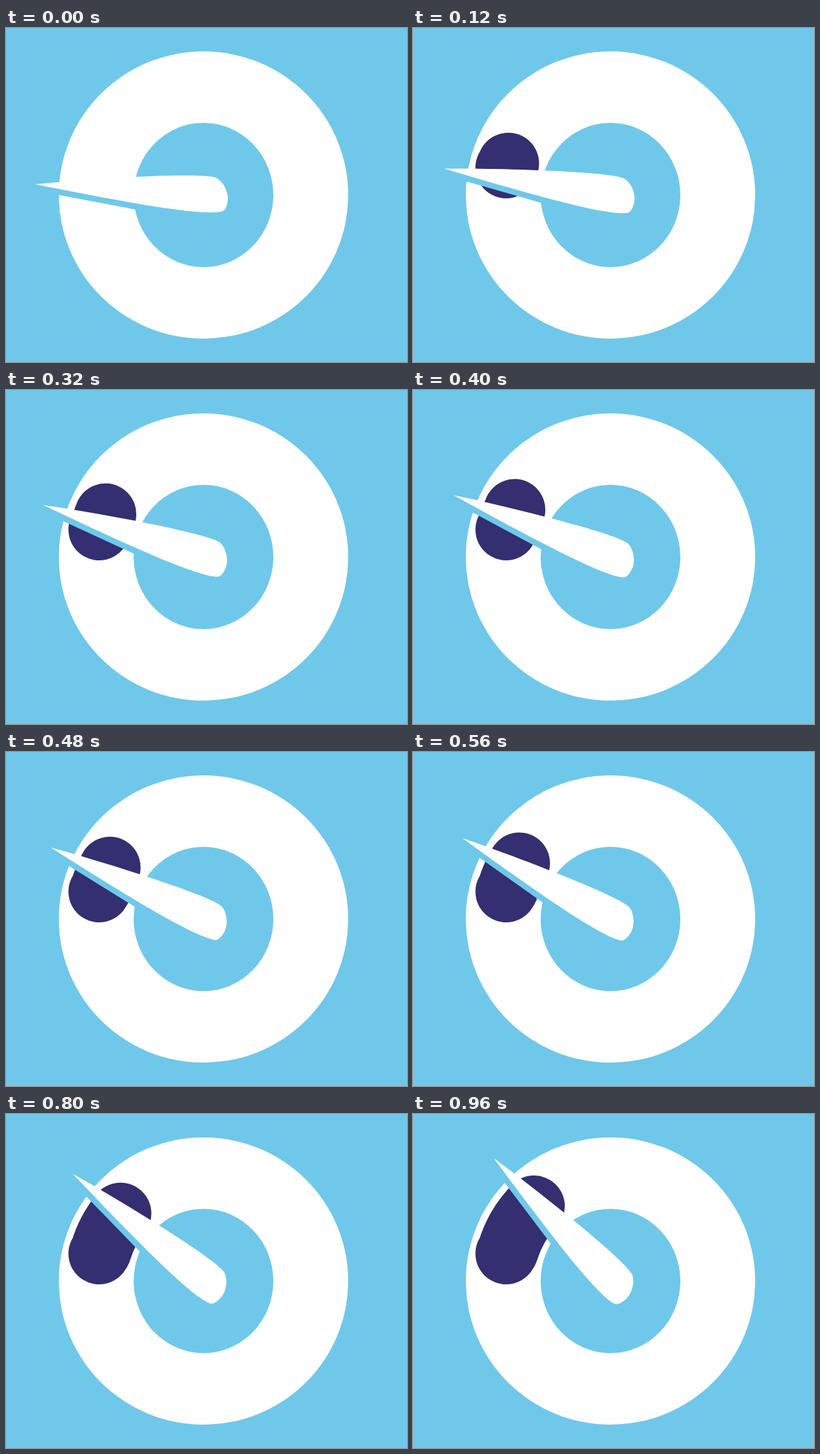
Recreate the animation shown at these times as an HTML page. Size 600 by 500 pixels, loop 1000 ms.

```html
<!DOCTYPE html>
<html>
<head>
<meta charset="utf-8">
<title>Gauge</title>
<style>
  html, body { margin: 0; height: 100%; overflow: hidden; background: #6fc8ea; }
  svg { display: block; }
</style>
</head>
<body>
<svg width="600" height="500" viewBox="0 0 600 500">
  <rect width="600" height="500" fill="#6fc8ea"/>
  <ellipse cx="295.5" cy="250" rx="216.5" ry="215" fill="#fff"/>
  <ellipse cx="295.5" cy="250" rx="104.5" ry="108" fill="#6fc8ea"/>
  <path id="level" fill="none" stroke="#332f70" stroke-width="92" stroke-linecap="round" stroke-linejoin="round"/>
  <g id="needle">
    <path fill="#6fc8ea" d="M44 234 L40 242.6 L240 280.4 L250 260 Z"/>
    <path fill="#fff" d="M44 234 C120 226 290 215 314 224 C323 228 333 243 332 257 C331 265 329 274 322 275 C295 280 220 269.5 44 234 Z"/>
  </g>
</svg>
<script>
const level = document.getElementById('level');
const needle = document.getElementById('needle');
const LOOP = 1000, STEP = 40;
const CX = 295.5, CY = 250, R = 160;

// point on the ring's middle line, in degrees above the left horizontal
function ringPoint(deg) {
  const a = deg * Math.PI / 180;
  return `${CX - R * Math.cos(a)} ${CY - R * Math.sin(a)}`;
}

function draw(now) {
  const k = Math.floor(now % LOOP / STEP);
  const end = 13.3 + 1.295 * k;
  const start = Math.min(16.5, end);
  needle.setAttribute('transform', `rotate(${1.757 * k} 300 250)`);
  level.setAttribute('d', k === 0 ? '' :
    `M139.4 209 L${ringPoint(start)} A${R} ${R} 0 0 1 ${ringPoint(end)}`);
  requestAnimationFrame(draw);
}
requestAnimationFrame(draw);
</script>
</body>
</html>
```
